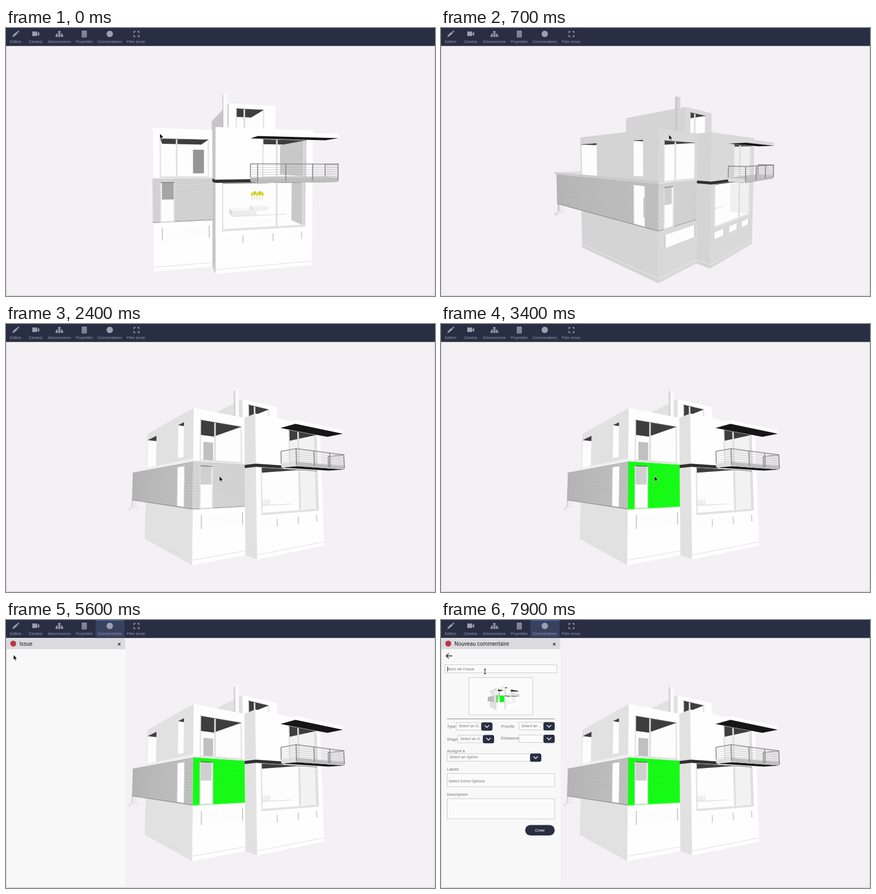
Write an HTML page that moves like this. It is 800 px wide and 500 px high and loops after 8 s.

```html
<!DOCTYPE html>
<html lang="fr">
<head>
<meta charset="utf-8">
<title>Maquette 3D</title>
<style>
html,body{margin:0;width:100%;height:100%;overflow:hidden;background:#f3f1f4}
svg{display:block;width:800px;height:500px}
text{font-family:Roboto,sans-serif;font-size:7.7px;fill:#777}
.bar text{font:7px "Liberation Sans",Arial,sans-serif;fill:#9598ab;text-anchor:middle}
.icon{fill:#9c9fb2}
.wire{fill:none;stroke:#9c9fb2;stroke-width:1.5}
.field{fill:#fcfbfc;stroke:#cbcacc}
.dark{fill:#2a2e41}
.hint{font-size:7.3px}
.hint tspan{fill:#222;font-weight:500}
text.white{fill:#fff}
.mid{text-anchor:middle}
</style>
</head>
<body>
<svg viewBox="0 0 800 500">
  <rect width="800" height="500" fill="#f3f1f4"/>
  <g id="house" stroke-linejoin="round"></g>
  <path d="M.5 34V499.5H799.5V34" fill="none" stroke="#cfced2"/>

  <g class="bar">
    <rect width="800" height="33.5" fill="#2a2e43"/>
    <g id="tab"><rect x="167" width="54" height="33.5" fill="#38425f"/><rect x="167" width="54" height="1.5" fill="#40659a"/></g>
    <path class="icon" d="M12 17l1-4 7-6 2.500 2.500-7 6zM21 6l1.500-1.500 2.500 2.500L23.500 8.500z"/>
    <path class="icon" d="M49 6.500h9v8.500h-9zM58.500 10l3.500-3v8l-3.500-3z"/>
    <path class="wire" d="M94.500 13.500V11.200H104.500V13.500M99.500 8V13.500"/>
    <path class="icon" d="M97.500 5.500h4v3.500h-4zM92.500 13h4v3.500h-4zM97.500 13h4v3.500h-4zM102.500 13h4v3.500h-4z"/>
    <path class="icon" d="M141.500 5h9v12.500h-9z"/>
    <path d="M143 7.500h6M143 10.500h6M143 13h6M143 15.500h6" stroke="#2a2e43" stroke-dasharray="1.500 .75"/>
    <circle class="icon" cx="193.500" cy="11" r="6"/>
    <path class="wire" d="M238.500 9.500V6.500h3M245 6.500h3v3M248 13v3h-3M241.500 16h-3v-3"/>
    <text x="18" y="28">Edition</text><text x="55" y="28">Caméra</text>
    <text x="99.500" y="28">Arborescence</text><text x="146" y="28">Propriétés</text>
    <text x="193.500" y="28">Commentaires</text><text x="242.500" y="28">Plein écran</text>
  </g>

  <g id="panel">
    <rect x="1" y="34" width="222" height="463" fill="#f9f8f9"/>
    <path d="M1 54.500V39q0-4 4-4H219q3.500 0 3.500 4V54.500z" fill="#dbdadc"/>
    <circle cx="13.500" cy="44" r="5.500" fill="#b93549"/>
    <text id="title" x="25" y="48" style="font-size:10.100px;fill:#222"></text>
    <path d="M209 43l4.400 4.400m0-4.400l-4.400 4.400" stroke="#222" stroke-width="1.200"/>
    <path id="back" d="M21 67H9.500m5-4.500L9.500 67l5 4.500" fill="none" stroke="#222" stroke-width="1.400"/>

    <g id="issue">
      <path d="M98 65.500l7-3.500v7zM125 65.500l-7-3.500v7zM111 62h1v8h-1z" class="dark"/>
      <path d="M189 72l2-.5 5 7 1 4-3.500-2zM207.500 74h8v1h-8zM210 72.500h3V74h-3z" fill="#222"/>
      <path d="M208.500 75.500v6.500h6v-6.500m-4 1v4.500m2-4.500v4.500" fill="none" stroke="#333"/>
      <rect class="field" x="11.500" y="94" width="200.500" height="94"/>
      <text x="17" y="105.500" style="font-size:7.800px">Nom du commentaire BCF</text>
      <path d="M51 125h7v8h-7zM42 133h14v17H42zM41 150h29v14l-15 7-15-6z" fill="#c4c4c4"/>
      <path d="M56 134h12v12H56zM58 156h10v7H58z" fill="#dedede"/>
      <path d="M54 127h2v4h-2zM44 137h5v2h-5zM56 151h13v2H56zM42 153h8v4h-8zM61 138h6v2h-6z" fill="#555"/>
      <g id="info"></g>
      <text x="11" y="205">Tous les commentaires :</text>
      <path class="dark" d="M23 213H200q4 0 4 4V245H23q-4 0-4-4V217q0-4 4-4z"/>
      <text class="white" x="25" y="227" style="font-size:7.200px;font-weight:700">velorin</text>
      <text class="white" x="54.500" y="227" font-style="italic">13/02/2018</text>
      <text class="white" x="25" y="237.500">Description.</text>
      <text x="11" y="264.500">Commentaire</text>
      <rect class="field" x="11.500" y="270.500" width="110" height="60.500"/>
      <rect class="field" x="127.500" y="270.500" width="80.500" height="60.500"/>
      <path class="dark" d="M157 293h5l2-3h8l2 3h5q2 0 2 2v14q0 2-2 2h-22q-2 0-2-2v-14q0-2 2-2z"/>
      <circle cx="168" cy="301.500" r="5.200" fill="none" stroke="#fff" stroke-width="2.400"/>
      <rect class="dark" x="135" y="342" width="77" height="19" rx="9.500"/>
      <text class="white mid" x="173.500" y="354">Commenter</text>
    </g>

    <g id="form">
      <rect class="field" x="7" y="83.500" width="209" height="15"/>
      <text x="12" y="94">Nom de l'issue</text>
      <path id="caret" d="M12.500 87v9" stroke="#222"/>
      <rect class="field" x="52" y="107.500" width="119" height="69.500"/>
      <use href="#house" transform="translate(52.300 102.500) scale(.148)"/>
      <path d="M11 184.500H212" stroke="#8a8a8c"/>
      <text x="11" y="201">Type</text><text x="112" y="201">Priorité</text>
      <text x="11" y="225">Stage</text><text x="112" y="222.500">Échéance</text>
      <text x="11" y="246.500">Assigné à</text>
      <g id="selects"></g>
      <text x="11" y="280.500">Labels</text>
      <rect class="field" x="11.500" y="286.500" width="200.500" height="24.500"/>
      <text class="hint" x="14" y="302.500">Select Some Options</text>
      <text x="11" y="328">Description</text>
      <rect class="field" x="11.500" y="333.500" width="200.500" height="37.500"/>
      <rect class="dark" x="157" y="382.500" width="55" height="19.500" rx="9.700"/>
      <text class="white mid" x="184.500" y="394.500">Créer</text>
    </g>
  </g>

  <g id="pointer">
    <path id="arrow" d="M0 0v9.500l2.200-2 1.600 3.600 1.500-.7-1.600-3.400h3z" stroke="#fff" stroke-width=".6"/>
    <path id="hand" d="M-1 0q1-1.500 2 0v3.500l4 1v3l-1 2.500h-4.500l-3-4 1-.8 1.500 1z" fill="#fff" stroke="#111" stroke-width=".9"/>
    <path id="beam" d="M-2-4.500q2 0 2 1v7q0 1-2 1m4-9q-2 0-2 1m0 7q0 1 2 1" fill="none" stroke="#222" stroke-width="1.100"/>
  </g>
</svg>
<script>
const LOOP = 8000, TURN = 700, PICK = 2500, OPEN = 4400, LEAVE = 5400, NEW = 6400, FORM = 6750, FOCUS = 7550;
const $ = id => document.getElementById(id);
const lerp = (a, b, k) => a + (b - a) * k;
const ease = k => (1 - Math.cos(Math.PI * k)) / 2;
const show = (id, on) => $(id).setAttribute('visibility', on ? 'inherit' : 'hidden');

// Camera orbiting the house; angles in degrees, lengths in wall heights, tones as grey levels.
const FOCAL = 446, DISTANCE = 2.405, PIVOT = [.612, .685, .64];
const views = [
  {yaw: 11.8, pitch: 1.3, front: 254, side: 198, inner: 200},
  {yaw: 45, pitch: 3, front: 217, side: 212, inner: 240},
  {yaw: 32.3, pitch: -4.9, front: 254, side: 225, inner: 242}
];
let cam, out, clips;

function project(point) {
  const [x, y, z] = point.map((v, i) => v - PIVOT[i]);
  const a = cam.yaw * Math.PI / 180, b = cam.pitch * Math.PI / 180;
  const right = x * Math.cos(a) - z * Math.sin(a), ahead = x * Math.sin(a) + z * Math.cos(a);
  const scale = FOCAL / (DISTANCE + ahead * Math.cos(b) - y * Math.sin(b));
  return [400 + right * scale, 267 - (y * Math.cos(b) + ahead * Math.sin(b)) * scale].map(v => v.toFixed(1));
}
const paint = tone => typeof tone === 'string' ? tone : `rgb(${Array(3).fill(Math.round(tone))})`;
const trace = pts => 'M' + pts.map(project).join('L');
const face = (tone, pts) => { out += `<path d="${trace(pts)}Z" fill="${paint(tone)}"/>`; };
const line = (tone, width, ...pts) => { out += `<path d="${trace(pts)}" fill="none" stroke="${paint(tone)}" stroke-width="${width}"/>`; };

// A wall maps (along, height, inward depth) to a point in space.
const frontAt = z => (s, y, d = 0) => [s, y, z + d];
const sideAt = x => (s, y, d = 0) => [x + d, y, s];
const leftWing = frontAt(0), rightWing = frontAt(-.125), roofRoom = frontAt(.257);
const leftSide = (s, y, d = 0) => [d - .045 * s, y, .93 * s];

const quad = (wall, s0, s1, y0, y1, d) => [wall(s0, y0, d), wall(s1, y0, d), wall(s1, y1, d), wall(s0, y1, d)];
const level = (wall, s0, s1, y, d0, d1) => [wall(s0, y, d0), wall(s1, y, d0), wall(s1, y, d1), wall(s0, y, d1)];
const panel = (tone, wall, ...box) => face(tone, quad(wall, ...box));

function rows(tone, width, count, wall, s0, s1, y0, y1) {
  for (let i = 0; i < count; i++) {
    const y = lerp(y0, y1, (i + .5) / count);
    line(tone, width, wall(s0, y), wall(s1, y));
  }
}

// A glazed hole: clipped interior with an optional ceiling, end wall and furniture.
function opening(wall, s0, s1, y0, y1, {depth = 0, ceilingEnd = s1, endDepth = 0, posts = [], inside, frame = 2} = {}) {
  const hole = quad(wall, s0, s1, y0, y1), id = 'hole' + clips++;
  face(253, hole);
  out += `<clipPath id="${id}"><path d="${trace(hole)}Z"/></clipPath><g clip-path="url(#${id})">`;
  if (endDepth) face(cam.inner, [wall(s1, y0, 0), wall(s1, y1, 0), wall(s1, y1, endDepth), wall(s1, y0, endDepth)]);
  if (depth) face(62, level(wall, s0, ceilingEnd, y1, 0, depth));
  if (inside) inside();
  out += '</g>';
  for (const s of posts) line(222, 3, wall(s, y0), wall(s, y1));
  if (frame) line(222, frame, wall(s0, y1), wall(s0, y0), wall(s1, y0), wall(s1, y1));
  if (depth) line(90, 1, wall(s0, y1), wall(s1, y1));
}

function box(top, front, side, x0, x1, z0, z1, y0, y1) {
  face(top, level(frontAt(0), x0, x1, y1, z0, z1));
  panel(side, sideAt(x0), z0, z1, y0, y1);
  panel(front, frontAt(z0), x0, x1, y0, y1);
}

function cladding(wall, length, base, slat) {
  panel(base, wall, 0, length, .344, .648);
  rows(slat, 1, 29, wall, 0, length, .344, .648);
  line(slat, 1.6, wall(0, .344), wall(length, .344));
}

function plinth(wall, s0, s1) {
  line(cam.front < 235 ? 236 : 222, 1, wall(s0, .03), wall(s1, .03));
}

function paintRoof() {
  panel(cam.side, sideAt(.602), .257, 1.1, .9, 1.265);
  panel(cam.front, roofRoom, .602, 1.025, .9, 1.265);
  opening(roofRoom, .668, .915, .9, 1.224, {depth: .33, posts: [.74]});
  box(250, cam.front - 4, cam.side - 12, .57, .607, .32, .35, .9, 1.36);
}

function paintLeftSide() {
  box(230, 236, 205, -.075, -.03, 1.33, 1.38, .26, .35);
  box(230, 240, 220, -.1, -.01, 1.31, 1.4, .235, .262);
  face(222, level(leftSide, .9, 1.56, .668, 0, .45));
  panel(cam.side, leftSide, 0, 1, 0, 1);
  plinth(leftSide, 0, 1);
  opening(leftSide, .73, .98, .668, .935, {depth: .12, frame: 0});
  opening(leftSide, .15, .25, .69, .935, {depth: .1, frame: 0});
  cladding(leftSide, 1.51, 206, 158);
  panel(cam.front - 14, leftSide, 0, 1.56, .648, .668);
  opening(leftSide, .135, .25, .35, .625, {frame: 1, inside: () => panel(178, leftSide, .1, .18, .4, .54, .03)});
}

function paintLeftWing(picked) {
  panel(cam.front, leftWing, 0, .418, 0, 1);
  plinth(leftWing, 0, .418);
  opening(leftWing, .051, .388, .66, .927, {
    depth: .4, posts: [.163],
    inside: () => panel(cam.inner - 50, leftWing, .32, .42, .67, .885, .46)
  });
  opening(leftWing, .062, .394, .215, .305, {frame: 0});
  for (const s of [.062, .394]) line(204, 2, leftWing(s, .215), leftWing(s, .305));
  cladding(leftWing, .418, picked ? '#0bf80b' : 229, picked ? '#2cff2c' : 176);
  line(226, 2, leftWing(0, .652), leftWing(.418, .652));
  opening(leftWing, .051, .145, .346, .622, {depth: .1, inside: () => panel(cam.inner - 34, leftWing, .06, .145, .5, .622, .015)});
}

function paintLivingRoom() {
  const floor = .329;
  box(246, 236, 222, .61, .816, .158, .27, floor, .372);
  box(248, 240, 226, .85, 1, .34, .42, floor, .365);
  line(214, 1, [.6, floor, .15], [1.08, floor, .15]);
  for (let i = 0; i < 5; i++) {
    const x = .945 + .028 * i, y = .425 + .012 * (i % 2);
    line(190, .7, [x, .38, .64], [x, y, .64]);
    panel(i % 2 ? '#b9d52c' : '#e4dd3a', frontAt(.64), x - .012, x + .018, y, y + .036);
  }
}

function paintRightWing() {
  panel(cam.side, sideAt(.418), -.125, 0, 0, 1);
  panel(cam.front, rightWing, .418, 1.147, 0, 1);
  plinth(sideAt(.418), -.125, 0);
  plinth(rightWing, .418, 1.147);
  panel(48, sideAt(.418), -.125, 0, .623, .645);
  panel(48, rightWing, .418, .68, .623, .645);
  opening(rightWing, .757, 1.092, .66, .925, {depth: .36, endDepth: .425, posts: [.862, 1.075]});
  opening(rightWing, .467, 1.087, .294, .619, {depth: .5, ceilingEnd: .86, endDepth: .2, posts: [.863, 1.07], inside: paintLivingRoom});
  line(226, 3, rightWing(.467, .3), rightWing(1.09, .3));
  for (let i = 0; i < 3; i++) {
    const s = .472 + .225 * i;
    opening(rightWing, s, s + .135, .208, .26, {frame: 0});
    line(204, 1.8, rightWing(s + .14, .2), rightWing(s + .14, .255));
  }
}

function paintBalcony() {
  const x0 = .665, x1 = 1.25, z0 = -.267, z1 = -.125, slab = .628, deck = .658, rail = .752;
  const plan = frontAt(0), front = frontAt(z0), end = sideAt(x0), far = sideAt(x1);

  panel(cam.front, end, z0, z1, .929, .957);
  panel(cam.front, front, x0, x1, .929, .957);
  face(22, level(plan, x0, x1, .929, z0, z1));

  face(196, level(plan, x0, x1, deck, z0, z1));
  face(22, level(plan, x0, x1, slab, z0, z1));
  panel(cam.inner - 20, end, z0, z1, slab, deck);
  panel(190, front, x0, x1, slab, deck);
  for (const [wall, a, b] of [[far, z0, z1], [end, z0, z1], [front, x0, x1]]) {
    rows(176, .6, 6, wall, a, b, deck, rail);
    line(128, 1.3, wall(a, rail), wall(b, rail));
  }
  for (let i = 0; i < 4; i++) {
    const x = lerp(x0, x1, i / 3);
    line(138, 1.8, front(x, rail), front(x, deck - .02));
  }
  for (const wall of [end, far]) line(138, 1.6, wall(z1, rail), wall(z1, deck));
}

function drawHouse(view, picked) {
  const i = Math.min(1, Math.floor(view));
  cam = {};
  for (const key in views[0]) cam[key] = lerp(views[i][key], views[i + 1][key], view - i);
  out = '';
  clips = 0;
  paintRoof();
  paintLeftSide();
  paintLeftWing(picked);
  paintRightWing();
  paintBalcony();
  $('house').innerHTML = out;
}

const details = ['Type: |Information', 'Priorité: |Medium', 'Assigné à:|', '|cameliadure@mail.test',
  'Stage: |Preliminary Planning', '|End', 'Deadline: |14/02/2018'];
$('info').innerHTML = details.map((row, i) => {
  const [label, value] = row.split('|');
  return `<text class="hint" x="101" y="${120 + 10 * i}">${label}<tspan>${value}</tspan></text>`;
}).join('');

function select(x, y, width, hint) {
  return `<rect class="field" x="${x + .5}" y="${y + .5}" width="${width}" height="14"/>
    <text class="hint" x="${x + 5}" y="${y + 9.3}">${hint}</text>
    <rect class="dark" x="${x + width}" y="${y}" width="21" height="15.500" rx="3.500"/>
    <path d="M${x + width + 6.5} ${y + 5.5}l4 4 4-4" fill="none" stroke="#fff" stroke-width="1.400"/>`;
}
$('selects').innerHTML = select(28, 191, 47, 'Select an O...') + select(145, 190.5, 46, 'Select an ...') +
  select(31, 214.5, 47, 'Select an O...') + select(145, 214, 46, '') + select(11, 249, 155, 'Select an Option');

// Pointer rests: arrival, departure, x, y.
const rests = [[0, 0, 287, 197], [700, 700, 425, 199], [1400, 1900, 369, 167], [2400, 3700, 398, 284],
  [4300, 4800, 197, 16], [5300, 5700, 14, 65], [6300, 6600, 102, 68], [7300, LOOP, 82, 96]];
function pointerAt(t) {
  const n = rests.findLastIndex(r => r[0] <= t), a = rests[n], b = rests[n + 1] || a;
  const k = t > a[1] ? ease((t - a[1]) / (b[0] - a[1])) : 0;
  return [lerp(a[2], b[2], k), lerp(a[3], b[3], k)];
}

let drawn = '';
function draw(t) {
  const view = t < TURN ? ease(t / TURN) : 1 + ease(Math.min(1, t / TURN - 1));
  const picked = t >= PICK, state = view + ' ' + picked;
  if (state !== drawn) drawHouse(view, picked);
  drawn = state;

  const [x, y] = pointerAt(t);
  const inBar = y < 33, inField = t >= FORM && y > 83;
  $('pointer').setAttribute('transform', `translate(${x.toFixed(1)} ${y.toFixed(1)})`);
  show('arrow', !inBar && !inField);
  show('hand', inBar);
  show('beam', inField);

  show('tab', t >= OPEN || inBar);
  show('panel', t >= OPEN);
  show('issue', t < LEAVE);
  show('form', t >= FORM);
  show('back', t < LEAVE || t >= FORM);
  show('caret', t >= FOCUS);
  $('title').textContent = t < NEW ? 'Issue' : 'Nouveau commentaire';
}

const start = performance.now();
function tick(now) {
  draw(Math.max(0, now - start) % LOOP);
  requestAnimationFrame(tick);
}
draw(0);
requestAnimationFrame(tick);
</script>
</body>
</html>
```
